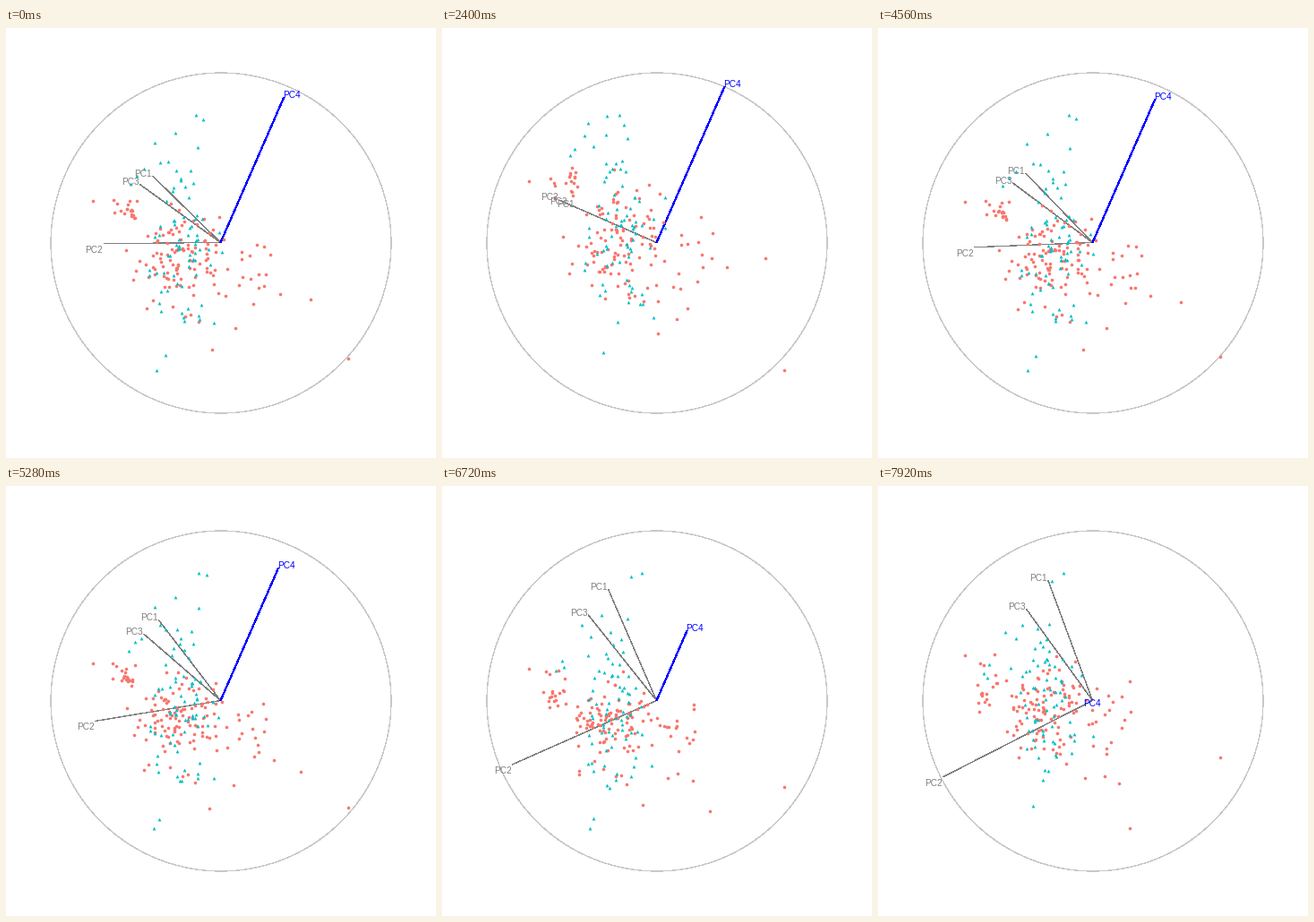
These frames come from a looping animation (480x480 px, 8000 ms). A matplotlib script:

```python
import numpy as np
import matplotlib.pyplot as plt
from matplotlib.animation import FuncAnimation
from matplotlib.patches import Circle

SIZE, DPI, TICK, LOOP = 480, 96, 40, 8000
PX = 72 / DPI                       # one pixel in points
MID, RADIUS = 239.5, 190
LOW, HIGH = 97, 382                 # the cloud always fills this square
UX, UY = 0.4, 0.917                 # direction of PC4, right and up
STEP = 0.05
START, PEAK = np.radians(68.5), np.radians(89.5)
RED, TEAL, GREY, BLUE = "#F8766D", "#00BFC4", "#7F7F7F", "#0000FF"

# Loadings along and across the PC4 direction while PC4 is out of the plane.
LOADINGS = {"PC1": (103, 99), "PC2": (-145, 119), "PC3": (63.7, 108)}

rng = np.random.default_rng(4)


def blob(n, mean, spread):
    """Random group: x, y with PC4 out of the plane, y in the opening pose."""
    noise = rng.triangular(-2, 0, 2, (n, 3)) * spread
    noise[:, 2] += 0.35 * (noise[:, 0] + 0.43 * noise[:, 1])
    return noise + mean


# Each class: a few outliers, then its middle and its fringes.
dots = np.vstack([
    [(97, 189, 193), (382, 303, 369), (281, 382, 303), (269, 332, 297),
     (253, 324, 288), (281, 218, 280), (231, 326, 359), (255, 299, 335)],
    blob(92, (184, 241, 246), (28, 28, 25)),
    blob(18, (119, 222, 201), (9, 18, 9)),
    blob(17, (253, 254, 277), (16, 30, 20)),
    blob(7, (185, 303, 312), (26, 8, 10)),
])
wedges = np.vstack([
    [(207, 97, 102), (194, 106, 97), (161, 155, 117), (142, 163, 128),
     (191, 154, 133), (184, 328, 382), (173, 357, 365)],
    blob(44, (190, 238, 244), (20, 32, 28)),
    blob(14, (168, 185, 168), (30, 26, 13)),
    blob(12, (200, 297, 316), (28, 12, 12)),
])
x, y, y0 = np.vstack([dots, wedges]).T

# Split each observation into three fixed coordinates.
across = x + 0.43 * y
flat = UX * x - UY * 0.986 * y
opening = UX * (across - 0.44 * y0) - UY * 1.009 * y0
depth = (opening - np.cos(START) * flat) / np.sin(START)


def tour_angle(t):
    """PC4 climbs into the plane, rests, then falls at a doubling pace."""
    if t < 2880:
        k = max(0, (t - 480) // 240)
        return min(START + min(k, 8) * STEP, np.pi / 2)
    k = (t - 2640) // 240 if t < 5520 else 12 + (t - 5520) // 120
    return max(PEAK - k * STEP, 0.0)


def fill(v):
    return LOW + (HIGH - LOW) * (v - v.min()) / (v.max() - v.min())


def cloud(angle):
    u = np.cos(angle) * flat + np.sin(angle) * depth
    v = -UY * across
    return fill(UX * u - UY * v), fill(-UY * u - UX * v)


fig = plt.figure(figsize=(SIZE / DPI, SIZE / DPI), dpi=DPI, facecolor="white")
ax = fig.add_axes([0, 0, 1, 1])
ax.set_xlim(0, SIZE)
ax.set_ylim(SIZE, 0)
ax.axis("off")

# Without antialiasing every touched pixel is filled, so strokes are thin.
ax.add_patch(Circle((SIZE / 2, SIZE / 2), RADIUS, fill=False, ec="#C8C8C8",
                    lw=0.3 * PX, antialiased=False))


def make_axis(name, color, width):
    line, = ax.plot([], [], color=color, lw=width * PX, antialiased=False,
                    solid_capstyle="butt", zorder=2)
    text = ax.text(0, 0, name, color=color, fontsize=10 * PX,
                   family="Liberation Sans", va="baseline", zorder=4)
    return line, text


def make_marks(shape, color, size):
    return ax.plot([], [], shape, color=color, ms=size * PX, mew=0,
                   antialiased=False, zorder=3)[0]


axes = {name: make_axis(name, GREY, 0.3) for name in LOADINGS}
axes["PC4"] = make_axis("PC4", BLUE, 1.1)
dot_marks = make_marks("o", RED, 3.6)
wedge_marks = make_marks("^", TEAL, 3.8)


def place_axis(name, along, side):
    """Draw an axis and push its label outward from the centre."""
    dx = UX * along - UY * side
    dy = -UY * along - UX * side
    line, text = axes[name]
    line.set_data([MID, MID + dx], [MID, MID + dy])
    if abs(dx) < 0.2:
        text.set_ha("center")
        text.set_position((MID - 1, MID + 6))
    else:
        text.set_ha("left" if dx > 0 else "right")
        text.set_position((MID + dx - 1, MID + dy + (10 if dy > 0 else 0.5)))


def draw(i):
    angle = tour_angle(i * TICK)
    for name, (along, side) in LOADINGS.items():
        place_axis(name, along * np.cos(angle), side)
    place_axis("PC4", RADIUS * np.sin(angle), 0)
    px, py = cloud(angle)
    n = len(dots)
    dot_marks.set_data(px[:n], py[:n])
    wedge_marks.set_data(px[n:], py[n:])
    return []


anim = FuncAnimation(fig, draw, frames=LOOP // TICK, interval=TICK,
                     init_func=lambda: draw(0), repeat=True, repeat_delay=0)
plt.show()
```
